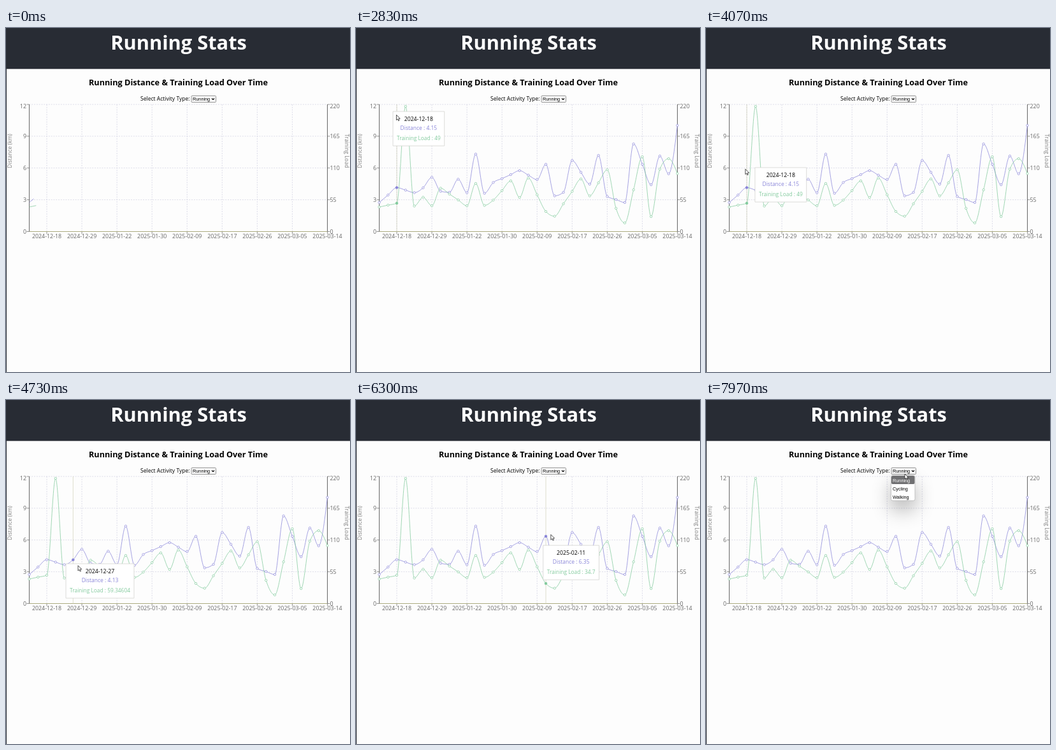
These frames come from a looping animation (540x540 px, 8 s). An HTML page with a canvas:

```html
<!DOCTYPE html>
<html lang="en">
<head>
<meta charset="utf-8">
<title>Running Stats</title>
<style>
  html, body { margin: 0; width: 100%; height: 100%; overflow: hidden; background: #fdfdfd; }
  canvas { display: block; width: 540px; height: 540px; }
</style>
</head>
<body>
<canvas id="stage"></canvas>
<script>
const LOOP = 8000, DRAW_START = -25, DRAW_TIME = 1500, MENU_OPEN = 7750;
const ACTIVE_LAG = 50, TIP_LAG = 150, TIP_GAP = 6;
const LEFT = 36.5, RIGHT = 504.5, TOP = 120, BOTTOM = 319.5, COUNT = 35;
const STEP = (RIGHT - LEFT) / (COUNT - 1);
const PAPER = '#fdfdfd', DARK = '#282c34', AXIS = '#666', GRID = '#d2d2e2',
      PURPLE = '#8884d8', GREEN = '#82ca9d';
const SANS = '"Open Sans", "Noto Sans", sans-serif', ARIAL = '"Liberation Sans", sans-serif';

// Every fourth run is labelled; the runs between are spread evenly.
const labelled = ['2024-12-18', '2024-12-29', '2025-01-22', '2025-01-30', '2025-02-09',
  '2025-02-17', '2025-02-26', '2025-03-05', '2025-03-14'];

// Turning points by run index
const distanceTurns = { 0: 2.74, 2: 4.15, 4: 3.67, 5: 4.13, 6: 5.12, 7: 3.8, 8: 3.7, 9: 4.94,
  10: 3.67, 11: 7.31, 12: 3.61, 13: 4.63, 16: 5.75, 18: 4.9, 19: 6.35, 20: 3.37, 21: 3.7,
  22: 6.71, 24: 4.4768, 25: 7.19, 26: 3.31, 28: 2.74, 29: 8.27, 31: 4.42, 32: 7.13,
  33: 5.45, 34: 10.02 };
const loadTurns = { 0: 42.4, 2: 49, 3: 216.7, 4: 44.1, 5: 59.34604, 6: 44.6, 7: 75, 10: 44.6,
  11: 83.2, 12: 45.2, 13: 54.391037, 15: 87.6, 16: 59, 17: 92.6, 19: 34.7, 20: 26.5, 23: 91,
  24: 61.736465, 26: 107, 27: 40.2, 28: 14.9, 30: 129.5, 31: 25.9, 32: 108, 33: 126.2,
  34: 100.3 };

// time, x, y of the pointer
const pointerPath = [
  [2700, 52, 125], [3330, 107, 180], [4330, 46, 236], [4730, 113, 260],
  [5400, 159, 156], [5630, 225, 260], [6800, 366, 175], [7300, 366, 175], [7700, 312, 116]
];

const canvas = document.getElementById('stage');
const ctx = canvas.getContext('2d');
const ratio = window.devicePixelRatio || 1;
canvas.width = canvas.height = 540 * ratio;

// Linear interpolation through rows of [position, ...values], held at both ends
function along(rows, at) {
  let k = rows.findIndex(row => row[0] > at);
  if (k < 0) return rows[rows.length - 1].slice(1);
  k = Math.max(k, 1);
  const a = rows[k - 1], b = rows[k];
  const f = Math.max(0, (at - a[0]) / (b[0] - a[0]));
  return a.slice(1).map((v, i) => v + (b[i + 1] - v) * f);
}

const runs = [...Array(COUNT).keys()];
const xAt = i => LEFT + i * STEP;
const fillIn = turns => {
  const rows = Object.entries(turns).map(([i, v]) => [Number(i), v]);
  return runs.map(i => along(rows, i)[0]);
};
const distance = fillIn(distanceTurns), load = fillIn(loadTurns);
const DAY = 864e5;
const labelDays = labelled.map((d, k) => [2 + 4 * k, Date.parse(d) / DAY]);
const dates = runs.map(i => {
  const day = Math.ceil(along(labelDays, i)[0]) - 2 * Math.max(0, 2 - i);
  return new Date(day * DAY).toISOString().slice(0, 10);
});
const series = [makeSeries(distance, 12, PURPLE), makeSeries(load, 220, GREEN)];

// Monotone cubic through the points, as a path with a known length
function makeSeries(values, max, color) {
  const ys = values.map(v => BOTTOM - v / max * (BOTTOM - TOP));
  const slope = ys.slice(1).map((y, i) => (y - ys[i]) / STEP);
  const tangent = ys.map((_, i) => {
    const a = slope[i - 1], b = slope[i];
    if (a === undefined || b === undefined) return 0;
    return (Math.sign(a) + Math.sign(b)) * Math.min(Math.abs(a), Math.abs(b), Math.abs(a + b) / 4);
  });
  const last = ys.length - 1;
  tangent[0] = (3 * slope[0] - tangent[1]) / 2;
  tangent[last] = (3 * slope[last - 1] - tangent[last - 1]) / 2;
  let d = `M${LEFT},${ys[0]}`;
  for (let i = 0; i < last; i++) {
    d += `C${xAt(i + 1 / 3)},${ys[i] + tangent[i] * STEP / 3} ` +
         `${xAt(i + 2 / 3)},${ys[i + 1] - tangent[i + 1] * STEP / 3} ${xAt(i + 1)},${ys[i + 1]}`;
  }
  const el = document.createElementNS('http://www.w3.org/2000/svg', 'path');
  el.setAttribute('d', d);
  return { ys, color, path: new Path2D(d), length: el.getTotalLength() };
}

// CSS "ease" timing
function ease(x) {
  if (x <= 0) return 0;
  if (x >= 1) return 1;
  let lo = 0, hi = 1;
  for (let n = 0; n < 20; n++) {
    const u = (lo + hi) / 2;
    if (.75 * u * (1 - u) + u ** 3 < x) lo = u; else hi = u;
  }
  return .3 * lo * (1 - lo) ** 2 + 3 * lo * lo * (1 - lo) + lo ** 3;
}

function text(str, x, y, size, color, align = 'center', family = SANS, weight = 400) {
  ctx.font = `${weight} ${size}px ${family}`;
  ctx.textAlign = align;
  ctx.fillStyle = color;
  ctx.fillText(str, x, y);
}

function sideText(str, x, angle) {
  ctx.save();
  ctx.translate(x, 193);
  ctx.rotate(angle);
  text(str, 0, 3, 8.5, '#808080');
  ctx.restore();
}

function line(x1, y1, x2, y2, color, width = 1, dash = []) {
  ctx.beginPath();
  ctx.moveTo(x1, y1);
  ctx.lineTo(x2, y2);
  ctx.strokeStyle = color;
  ctx.lineWidth = width;
  ctx.setLineDash(dash);
  ctx.stroke();
  ctx.setLineDash([]);
}

function dot(x, y, r, fill, stroke) {
  ctx.beginPath();
  ctx.arc(x, y, r, 0, 2 * Math.PI);
  ctx.fillStyle = fill;
  ctx.fill();
  ctx.strokeStyle = stroke;
  ctx.lineWidth = .7;
  ctx.stroke();
}

function box(x, y, w, h, r, fill, stroke) {
  ctx.beginPath();
  ctx.roundRect(x, y, w, h, r);
  ctx.fillStyle = fill;
  ctx.fill();
  if (!stroke) return;
  ctx.shadowColor = 'transparent';
  ctx.strokeStyle = stroke;
  ctx.lineWidth = .8;
  ctx.stroke();
}

function drawPage() {
  ctx.fillStyle = PAPER;
  ctx.fillRect(0, 0, 540, 540);
  ctx.fillStyle = DARK;
  ctx.fillRect(0, 0, 540, 64.3);
  ctx.fillRect(0, 64, 1, 476);
  text('Running Stats', 271, 34.3, 30.8, '#fff', 'center', SANS, 700);
  text('Running Distance & Training Load Over Time', 270.5, 90, 12.7, '#000', 'center', SANS, 700);
  text('Select Activity Type:', 211, 114, 8.55, '#000', 'left');
  box(291, 106.5, 38.5, 10, 1, PAPER, '#767676');
  text('Running', 293, 114, 7.3, '#000', 'left', ARIAL);
  ctx.beginPath();
  ctx.moveTo(323, 110.5);
  ctx.lineTo(325, 112.5);
  ctx.lineTo(327, 110.5);
  ctx.strokeStyle = '#000';
  ctx.lineWidth = 1.1;
  ctx.stroke();
}

function drawAxes() {
  for (let k = 0; k <= 4; k++) {
    const y = BOTTOM - k * (BOTTOM - TOP) / 4;
    const base = k === 4 ? 126 : y + 3.2;
    if (k) line(LEFT, y, RIGHT, y, GRID, .8, [1.9, 1.9]);
    line(LEFT - 4, y, LEFT, y, AXIS, .7);
    line(RIGHT, y, RIGHT + 4, y, AXIS, .7);
    text(String(k * 3), 32, base, 8.9, AXIS, 'right');
    text(String(k * 55), 508.5, base, 8.9, AXIS, 'left');
  }
  for (let i = 2; i < COUNT; i += 4) {
    line(xAt(i), TOP, xAt(i), BOTTOM, GRID, .8, [1.9, 1.9]);
    line(xAt(i), BOTTOM, xAt(i), BOTTOM + 4, AXIS, .7);
    text(dates[i], xAt(i), 330, 8.9, AXIS);
  }
  line(LEFT, BOTTOM, RIGHT, BOTTOM, '#acac80');
  line(LEFT, TOP, LEFT, BOTTOM, AXIS);
  line(RIGHT, TOP, RIGHT, BOTTOM, AXIS);
  sideText('Distance (km)', 6, -Math.PI / 2);
  sideText('Training Load', 534.5, Math.PI / 2);
}

function drawSeries(progress) {
  for (const s of series) {
    ctx.strokeStyle = s.color;
    ctx.lineWidth = .75;
    ctx.setLineDash(progress < 1 ? [s.length * progress, s.length] : []);
    ctx.stroke(s.path);
    ctx.setLineDash([]);
  }
  if (progress < 1) return;
  for (const s of series) s.ys.forEach((y, i) => dot(xAt(i), y, 1.7, '#fff', s.color));
}

function drawTooltip(i, x, y) {
  const loadText = `Training Load : ${Number(load[i].toFixed(6))}`;
  ctx.font = `400 8.4px ${SANS}`;
  const w = ctx.measureText(loadText).width + 12, mid = x + w / 2;
  box(x, y, w, 54, 0, '#fff', '#d4d4d0');
  text(dates[i], mid, y + 15, 8.7, '#000');
  text(`Distance : ${Number(distance[i].toFixed(4))}`, mid, y + 29, 8.5, PURPLE);
  text(loadText, mid, y + 45, 8.4, GREEN);
}

function drawMenu() {
  ctx.save();
  ctx.shadowColor = 'rgba(0, 0, 0, .3)';
  ctx.shadowBlur = 30 * ratio;
  ctx.shadowOffsetY = 14 * ratio;
  box(290.5, 118.5, 37.5, 39.5, 2.5, '#fff', '#b8b8b8');
  ctx.restore();
  box(291, 119, 36.5, 13, 2, '#707072');
  ['Running', 'Cycling', 'Walking'].forEach((name, i) =>
    text(name, 293, 128.7 + i * 13.2, 7.3, i ? '#000' : '#fff', 'left', ARIAL));
}

function drawPointer(x, y) {
  const outline = [[0, 0], [0, 8.2], [1.9, 6.5], [3.2, 9.3], [4.5, 8.7], [3.3, 6], [5.8, 5.8]];
  ctx.beginPath();
  outline.forEach(([dx, dy]) => ctx.lineTo(x + dx, y + dy));
  ctx.closePath();
  ctx.fillStyle = '#fff';
  ctx.fill();
  ctx.strokeStyle = '#222';
  ctx.lineWidth = .8;
  ctx.stroke();
}

function draw(t) {
  ctx.setTransform(ratio, 0, 0, ratio, 0, 0);
  drawPage();
  drawAxes();
  drawSeries(ease((t - DRAW_START) / DRAW_TIME));
  if (t < pointerPath[0][0]) return;

  const [px, py] = along(pointerPath, t);
  if (py >= TOP) {
    // The active run and the tooltip trail behind the pointer.
    const i = Math.round((along(pointerPath, t - ACTIVE_LAG)[0] - LEFT) / STEP);
    const [tipX, tipY] = along(pointerPath, t - TIP_LAG);
    line(xAt(i), TOP, xAt(i), BOTTOM, '#d0d0b8', .7);
    for (const s of series) dot(xAt(i), s.ys[i], 1.8, s.color, s.color);
    drawTooltip(i, tipX + TIP_GAP, tipY + TIP_GAP);
  }
  if (t >= MENU_OPEN) drawMenu();
  drawPointer(px, py);
}

const start = performance.now();
function tick() {
  draw((performance.now() - start) % LOOP);
  requestAnimationFrame(tick);
}
tick();
</script>
</body>
</html>
```
